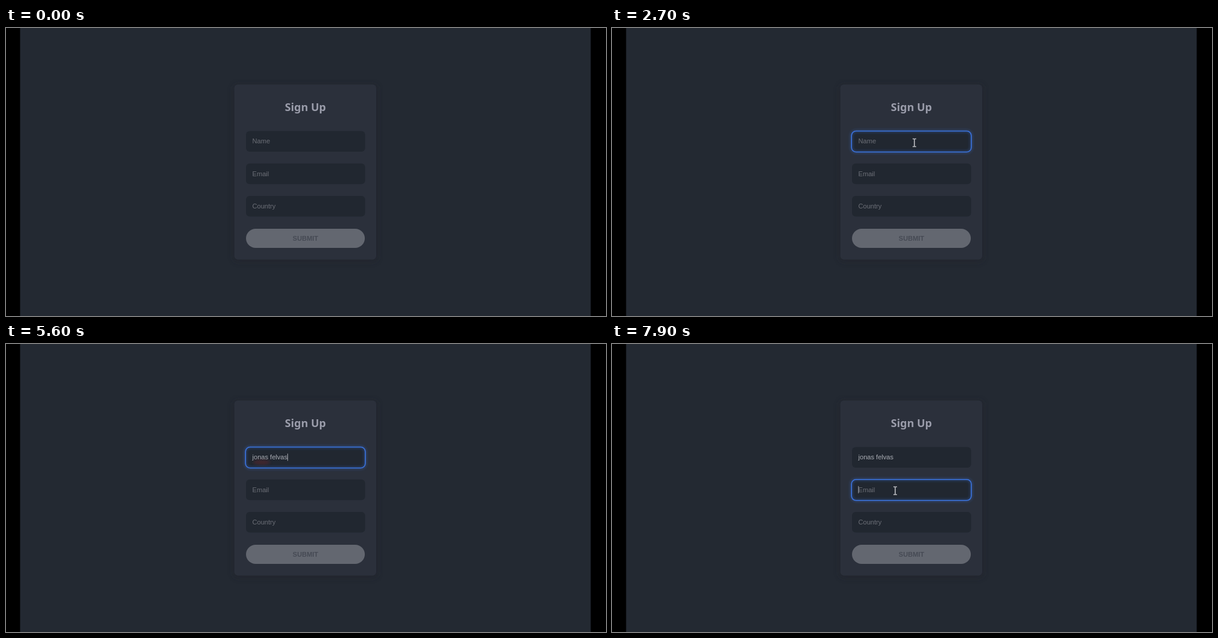
An HTML page that plays this animation: 1000 px wide and 482 px high, repeating every 8 s.

```html
<!DOCTYPE html>
<html lang="en">
<head>
<meta charset="utf-8">
<title>Sign Up</title>
<style>
  html, body { margin: 0; width: 100%; height: 100%; overflow: hidden; background: #000; }
  svg { display: block; width: 100%; height: 100%; }
  text { font: 11.1px "Liberation Sans", Arial, sans-serif; fill: #6c6f77; }
  .title { font: 600 18px "Noto Sans", sans-serif; fill: #9b9dab; text-anchor: middle; }
  .submit { font-weight: bold; fill: #464a54; text-anchor: middle; }
  .typed { fill: #a9acb3; }
</style>
</head>
<body>
<svg viewBox="0 0 1000 482">
  <defs>
    <filter id="soft" x="-20%" y="-60%" width="140%" height="220%"><feGaussianBlur stdDeviation="2"/></filter>
    <filter id="shade" x="-20%" y="-20%" width="140%" height="140%"><feGaussianBlur stdDeviation="5"/></filter>
  </defs>
  <rect x="23.5" width="951" height="482" fill="#232932"/>
  <rect x="379" y="95" width="240" height="296" rx="8" fill="#20242c" opacity=".5" filter="url(#shade)"/>
  <rect x="380.5" y="94.5" width="236.5" height="293" rx="6" fill="#2b303b"/>
  <text class="title" x="499" y="139">Sign Up</text>
  <g id="fields"></g>
  <ellipse id="spell" cx="426" cy="198" rx="14" ry="4" fill="#51282e" opacity=".65" filter="url(#soft)"/>
  <g id="ring" fill="none" stroke="#3b74e0">
    <rect x="399.2" y="172.5" width="199.6" height="35" rx="7.5" stroke-width="4" opacity=".35" filter="url(#soft)"/>
    <rect x="399.2" y="172.5" width="199.6" height="35" rx="7.5" stroke-width="1.6"/>
  </g>
  <path id="caret" stroke="#a9acb3"/>
  <rect x="400" y="336" width="198" height="32" rx="16" fill="#636770"/>
  <text class="submit" x="499" y="355.7">SUBMIT</text>
  <path id="arrow" d="M.5.5V13L3.4 10.3L5.3 14.5L7.4 13.6L5.6 9.5H9.4Z" fill="#23262d" stroke="#c6c7cb" stroke-width="1.2" stroke-linejoin="round"/>
  <path id="beam" d="M-3-6.5H-1Q0-6.5 0-5.5Q0-6.5 1-6.5H3M0-5.5V5.5M-3 6.5H-1Q0 6.5 0 5.5Q0 6.5 1 6.5H3" fill="none" stroke="#b4b6ba" stroke-width="1.7"/>
</svg>
<script>
const $ = id => document.getElementById(id);
const LOOP = 8000, STEP = 100, GAP = 54.3, LEFT = 410.5;
const NAME = "jonas felvas";
const KEYS = [3500, 3700, 3800, 4000, 4300, 4400, 4500, 4900, 5100, 5300, 5400, 5600];

$("fields").innerHTML = ["Name", "Email", "Country"].map((label, i) => `
  <rect x="400" y="${172.5 + i * GAP}" width="198.5" height="34.5" rx="6" fill="#212730"/>
  <text x="${LEFT}" y="${193.4 + i * GAP}">${label}</text>`).join("");
const nameText = $("fields").querySelector("text");

const easeOut = p => 1 - (1 - p) ** 2.5;
const smooth = p => p * p * (3 - 2 * p);

// Pointer moves: start, end, from, to, easing
const MOVES = [
  [400, 1100, [718, 132], [546, 150], easeOut],
  [1200, 1600, [546, 150], [507, 208], smooth],
  [1700, 2100, [507, 208], [504, 192], smooth],
  [6500, 6900, [504, 192], [575, 114], smooth],
  [7100, 7900, [575, 114], [472, 245.5], smooth],
];

function pointer(t) {
  const [start, end, a, b, ease] = MOVES.findLast(m => t >= m[0]) || MOVES[0];
  const p = ease(Math.min(1, Math.max(0, (t - start) / (end - start))));
  return a.map((v, i) => v + (b[i] - v) * p);
}

const show = (el, on) => el.setAttribute("visibility", on ? "visible" : "hidden");

function drawPointer(t) {
  const [x, y] = pointer(t);
  const visible = t >= 400 && !(t >= 3500 && t < 6400);
  const row = (y - 172.5) / GAP;
  const inField = x > 400 && x < 598 && row >= 0 && row < 3 && row % 1 < 34.5 / GAP;
  for (const id of ["arrow", "beam"]) {
    $(id).setAttribute("transform", `translate(${x} ${y})`);
    show($(id), visible && inField === (id === "beam"));
  }
}

function draw(t) {
  const count = KEYS.filter(k => t >= k).length;
  nameText.textContent = count ? NAME.slice(0, count) : "Name";
  nameText.setAttribute("class", count ? "typed" : "");

  const onName = t >= 2100 && t < 6900, onEmail = t >= 7800;
  const shift = onEmail ? GAP : 0;
  show($("ring"), onName || onEmail);
  $("ring").setAttribute("transform", `translate(0 ${shift})`);
  show($("spell"), onName && t >= 4400);

  const reset = onEmail ? 7800 : count ? KEYS[count - 1] + STEP : 2100;
  const lit = Math.floor(Math.max(0, t - reset) / 600) % 2 === 0;
  const width = count && onName ? nameText.getComputedTextLength() : 0;
  $("caret").setAttribute("d", `M${LEFT + width + .3} ${183.5 + shift}v12`);
  show($("caret"), lit && (onName || onEmail));

  drawPointer(t);
}

function frame() {
  draw(Math.floor(performance.now() % LOOP / STEP) * STEP);
  requestAnimationFrame(frame);
}
frame();
</script>
</body>
</html>
```
